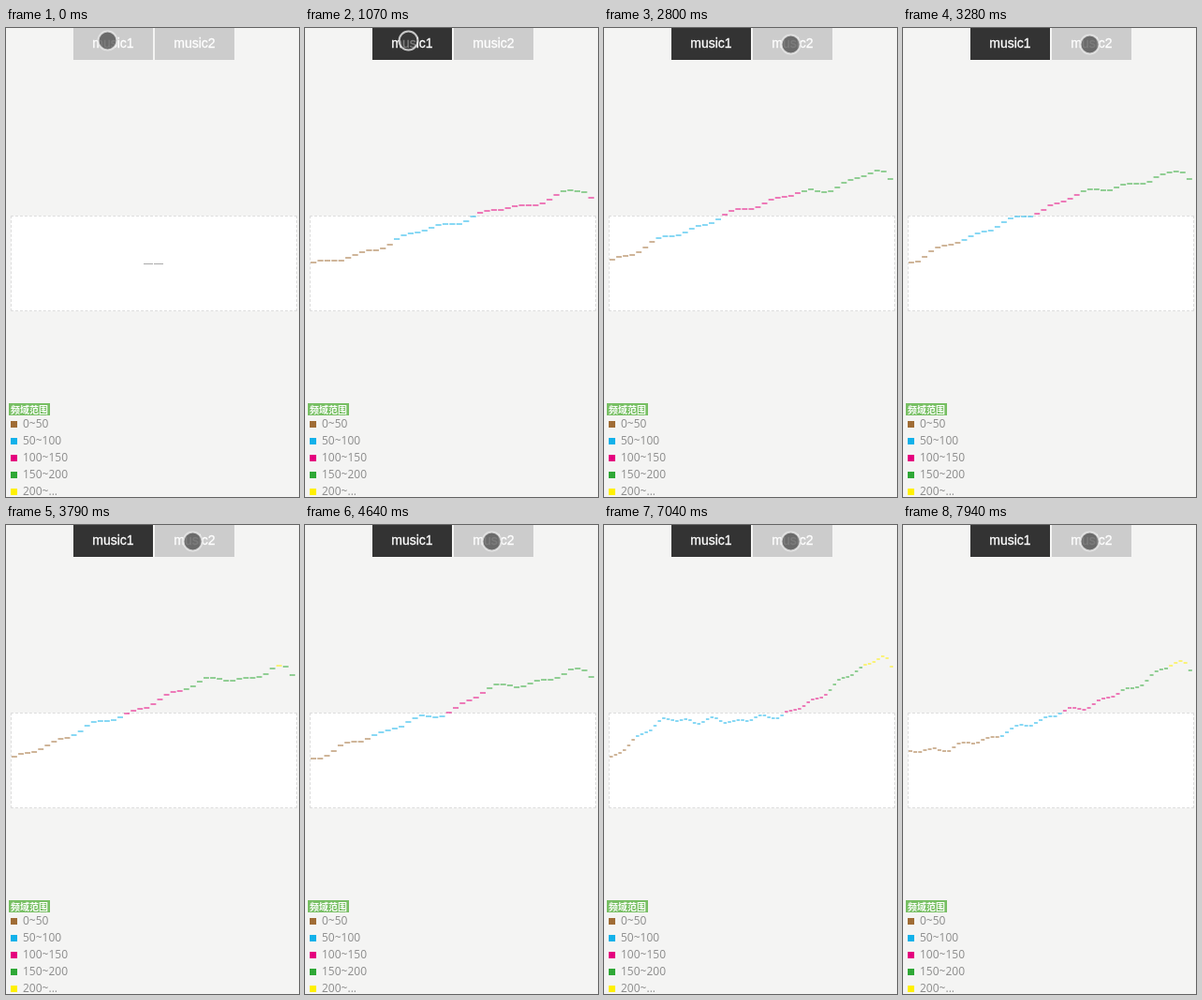
An HTML page with a canvas for the animation above (8000 ms loop, 313 by 500 pixels).

```html
<!DOCTYPE html>
<html lang="zh">
<head>
<meta charset="utf-8">
<title>Spectrum</title>
<style>
html, body { margin: 0; width: 100%; height: 100%; overflow: hidden; background: #f4f4f3; }
body { position: relative; }
canvas { position: absolute; left: 0; top: 0; }
.btn { position: absolute; top: 0; width: 85px; height: 34px; background: #ccc; color: #fff;
  font: 14px/33px "Liberation Sans", Arial, sans-serif; text-align: center; -webkit-text-stroke: 0.3px #fff; }
.btn.on { background: #333; }
#one { left: 72px; }
#two { left: 159px; }
.panel { position: absolute; left: 5px; top: 200px; width: 306px; height: 102px; box-sizing: border-box;
  background: #fff; border: 1px dashed #ddd; }
.title { position: absolute; left: 3px; top: 400px; width: 44px; height: 13px; background: #77bf63; color: #fff;
  font: bold 10px/13px "Noto Sans CJK SC", "Noto Sans CJK", sans-serif; text-align: center; white-space: nowrap; }
.row { position: absolute; left: 18px; height: 18px; color: #8c8c8c;
  font: 12px/18px "Open Sans", sans-serif; white-space: nowrap; }
.row i { position: absolute; left: -13px; top: 6px; width: 7px; height: 7px; }
</style>
</head>
<body>
<div class="btn" id="one">music1</div>
<div class="btn" id="two">music2</div>
<div class="panel"></div>
<div class="title">频域范围</div>
<canvas width="313" height="500"></canvas>
<script>
const LOOP = 8000, CLICK = 430, START = 580;
const COLORS = ['#a06c35', '#12b1ea', '#e5007f', '#2fa836', '#fff000'];
const RANGES = ['0~50', '50~100', '100~150', '150~200', '200~...'];

// Rough spectrum outlines: time, bar count, heights evenly spaced from left to right.
const POSES = [
  { t: START, n: 41, y: [250, 250] },
  { t: 1880, n: 41, y: [249, 241, 216, 200, 183, 172, 150] },
  { t: 2800, n: 43, y: [247, 227, 209, 190, 177, 167, 144] },
  { t: 3790, n: 43, y: [249, 228, 208, 191, 166, 164, 143] },
  { t: 5720, n: 40, y: [246, 232, 216, 204, 179, 171, 147] },
  { t: 7040, n: 65, y: [248, 211, 209, 207, 196, 164, 134] },
  { t: 7940, n: 59, y: [242, 236, 222, 204, 189, 167, 138] }
];

const ctx = document.querySelector('canvas').getContext('2d');
const one = document.getElementById('one');
const clamp = (v, a, b) => Math.min(b, Math.max(a, v));
const mix = (a, b, p) => a + (b - a) * p;

RANGES.forEach((text, i) => {
  const row = document.createElement('div');
  row.className = 'row';
  row.style.top = 413 + 18 * i + 'px';
  row.innerHTML = `<i style="background:${COLORS[i]}"></i>${text}`;
  document.body.append(row);
});

// Catmull-Rom curve through evenly spaced heights, u in 0..1.
function curve(y, u) {
  const last = y.length - 1, x = u * last, i = Math.floor(x), f = x - i;
  const [a, b, c, d] = [-1, 0, 1, 2].map(k => y[clamp(i + k, 0, last)]);
  return b + f / 2 * (c - a + f * (2 * a - 5 * b + 4 * c - d + f * (3 * (b - c) + d - a)));
}

// The analyser refreshes every 30 ms, later every 60 ms.
function snap(t) {
  const [base, tick] = t < 3790 ? [2800, 30] : [4700, 60];
  return Math.max(START, base + Math.floor((t - base) / tick) * tick);
}

function drawBars(time) {
  const t = snap(time);
  const k = clamp(POSES.findIndex(pose => pose.t > t), 1, Infinity) || 1;
  const to = POSES[t >= POSES.at(-1).t ? POSES.length - 1 : k];
  const from = POSES[POSES.indexOf(to) - 1];
  const raw = clamp((t - from.t) / (to.t - from.t), 0, 1);
  const p = from.t === START ? 1 - (1 - raw) ** 4 : raw;
  const n = Math.round(mix(from.n, to.n, p)), pitch = 304 / n;
  const rise = 1 - Math.exp((START - t) / 200);
  ctx.globalAlpha = 0.5;
  for (let i = 0; i < n; i++) {
    const u = i / (n - 1), bin = n - 1 - i;
    const ripple = 2 * Math.sin(bin * 1.1 + t / 170) + 1.5 * Math.sin(bin * 0.63 - t / 260);
    const rolloff = 17 * Math.exp(-bin / 1.2);
    const base = mix(curve(from.y, u), curve(to.y, u), p);
    const y = Math.min(250, base + rise * (ripple * Math.min(1, bin / 3) + rolloff));
    ctx.fillStyle = COLORS[clamp(Math.floor((251 - y) / 25), 0, 4)];
    ctx.fillRect(6 + i * pitch, Math.round(y) - 1, pitch - 1.2, 2);
  }
  ctx.globalAlpha = 1;
}

function drawPointer(t) {
  const p = clamp((t - 1000) / 800, 0, 1), e = p * p * (3 - 2 * p);
  ctx.beginPath();
  ctx.arc(mix(108.5, 199.5, e), mix(13.5, 17.5, e), 10, 0, 2 * Math.PI);
  ctx.fillStyle = 'rgba(60,60,60,0.67)';
  ctx.fill();
  ctx.strokeStyle = 'rgba(235,235,235,0.8)';
  ctx.lineWidth = 2;
  ctx.stroke();
}

function render(now) {
  const t = now % LOOP;
  one.classList.toggle('on', t >= CLICK);
  ctx.clearRect(0, 0, 313, 500);
  if (t < CLICK) {
    ctx.fillStyle = '#aaa';
    ctx.fillRect(147, 251, 10, 1);
    ctx.fillRect(158, 251, 10, 1);
  }
  if (t >= START) drawBars(t);
  drawPointer(t);
}

const origin = performance.now();
function loop() {
  render(performance.now() - origin);
  requestAnimationFrame(loop);
}
loop();
</script>
</body>
</html>
```
